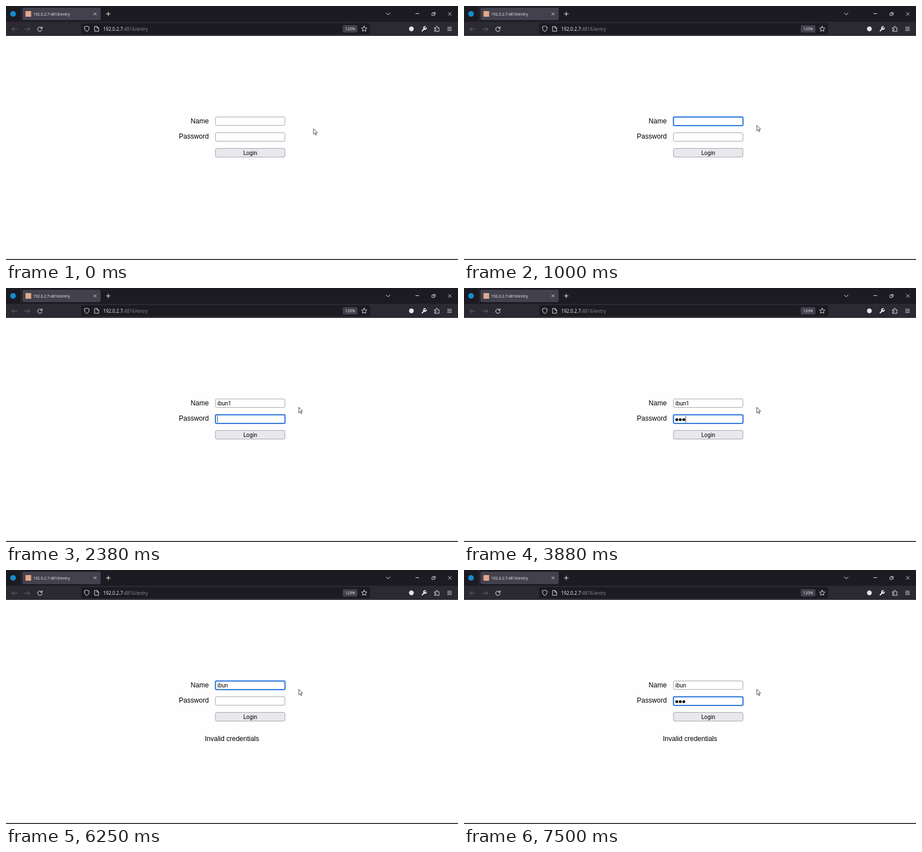
An HTML page with a canvas that plays this animation: 800 by 450 pixels, repeating every 8000 ms.

```html
<!DOCTYPE html>
<html lang="en">
<head>
<meta charset="utf-8">
<title>Login form</title>
<style>
  html, body { margin: 0; width: 100%; height: 100%; overflow: hidden; background: #fefefe; }
  canvas { display: block; width: 800px; height: 450px; }
</style>
</head>
<body>
<canvas id="stage"></canvas>
<script>
const canvas = document.getElementById('stage');
const ctx = canvas.getContext('2d');
const ratio = window.devicePixelRatio || 1;
canvas.width = 800 * ratio;
canvas.height = 450 * ratio;

const LOOP = 8000;
const UI = '"Open Sans", sans-serif';
const LABEL = '12px "Liberation Sans", Arial, sans-serif';
const FIELD = '10px Roboto, sans-serif';
const LIGHT = '#f4f4f8', DIM = '#6c6b75', BORDER = '#8f8f9d';
const HOST = '192.0.2.7', PATH = ':4816/entry';
const USER = 'ibun1';

// Each step lists only what changes: typed = letters in the name, dots = letters in the password.
const steps = [
  [0, { focus: '', caret: false, typed: 0, dots: 0, error: false, mouse: [544, 217], beam: false }],
  [130, { mouse: [523, 212] }],
  [250, { mouse: [486, 205], beam: true }],
  [380, { mouse: [478, 205] }],
  [500, { focus: 'name', caret: true }],
  [750, { mouse: [487, 206] }],
  [880, { mouse: [510, 209], beam: false }],
  [1000, { mouse: [518, 211], caret: false }],
  [1500, { typed: 1, caret: true }],
  [1630, { typed: 2 }],
  [1750, { typed: 3 }],
  [1880, { typed: 4 }],
  [2130, { typed: 5, caret: false }],
  [2380, { focus: 'password', caret: true }],
  [2880, { dots: 2 }],
  [3130, { dots: 3 }],
  [3380, { caret: false }],
  [3880, { caret: true }],
  [4250, { typed: 0, dots: 0, error: true }],
  [4500, { caret: false }],
  [5000, { caret: true }],
  [5130, { focus: 'name' }],
  [5250, { typed: 1 }],
  [5380, { typed: 2 }],
  [5630, { typed: 3 }],
  [5880, { typed: 4 }],
  [6250, { caret: false }],
  [6380, { focus: 'password', caret: true }],
  [6880, { caret: false }],
  [7000, { dots: 1 }],
  [7250, { dots: 2 }],
  [7500, { dots: 3 }]
];

function stateAt(time) {
  const state = {};
  for (const [start, change] of steps) {
    if (start > time) break;
    Object.assign(state, change);
  }
  return state;
}

function rect(x, y, w, h, color) {
  ctx.fillStyle = color;
  ctx.fillRect(x, y, w, h);
}

function box(x, y, w, h, radius, fill, stroke, width = 0.8) {
  ctx.beginPath();
  ctx.roundRect(x, y, w, h, radius);
  if (fill) { ctx.fillStyle = fill; ctx.fill(); }
  if (stroke) { ctx.strokeStyle = stroke; ctx.lineWidth = width; ctx.stroke(); }
}

function disc(x, y, r, color) {
  ctx.beginPath();
  ctx.arc(x, y, r, 0, Math.PI * 2);
  ctx.fillStyle = color;
  ctx.fill();
}

function text(str, x, y, font, color, align = 'left') {
  ctx.font = font;
  ctx.fillStyle = color;
  ctx.textAlign = align;
  ctx.fillText(str, x, y);
  return ctx.measureText(str).width;
}

// Strokes an SVG path placed at x, y.
function icon(x, y, path, color = LIGHT, width = 1) {
  ctx.save();
  ctx.translate(x, y);
  ctx.strokeStyle = color;
  ctx.lineWidth = width;
  ctx.lineJoin = ctx.lineCap = 'round';
  ctx.stroke(new Path2D(path));
  ctx.restore();
}

function drawTabs() {
  rect(0, 0, 800, 28, '#1c1b22');
  disc(12.5, 14, 5, '#168bd2');
  rect(26, 0, 1, 28, '#34333c');
  box(29, 3, 138.5, 22, 3, '#42414d');
  rect(34.5, 9, 10, 10, '#e3a88b');
  text(HOST + PATH, 48, 16.6, '6.8px ' + UI, LIGHT);
  icon(157.5, 14, 'M-2.2-2.2L2.2 2.2M2.2-2.2L-2.2 2.2', LIGHT, 0.8);
  icon(181, 14, 'M-3.5 0H3.5M0-3.5V3.5');
  icon(676.5, 14, 'M-3.3-1.6L0 1.7L3.3-1.6');
  icon(728, 13.5, 'M-2.8 0H2.8', LIGHT, 0.9);
  icon(757, 14, 'M-2.8-1.2H1.2V2.8H-2.8ZM-1.2-2.6H2.8V1.2', LIGHT, 0.8);
  icon(785.5, 14, 'M-2.8-2.8L2.8 2.8M2.8-2.8L-2.8 2.8', LIGHT, 0.8);
}

function drawStar(x, y) {
  let path = '';
  for (let i = 0; i < 10; i++) {
    const r = i % 2 ? 2.4 : 5;
    const a = i * Math.PI / 5 - Math.PI / 2;
    path += (i ? 'L' : 'M') + r * Math.cos(a) + ' ' + r * Math.sin(a);
  }
  icon(x, y, path + 'Z', LIGHT, 0.9);
}

function drawToolbar() {
  rect(0, 28, 800, 25, '#2b2a33');
  icon(15, 41, 'M4.5 0H-4.5M-1-3.5L-4.5 0L-1 3.5', DIM);
  icon(37.5, 41, 'M-4.5 0H4.5M1-3.5L4.5 0L1 3.5', DIM);
  icon(60, 41, 'M3.2-2.2A3.9 3.9 0 1 0 3.9 .8M4-4.3V-1.4H1.1');

  box(133, 30.5, 511.5, 19.5, 2.5, '#1c1b22');
  icon(143, 40.5, 'M0-4.8L4.2-3.2C4.2 1 2.7 3.6 0 4.8C-2.7 3.6-4.2 1-4.2-3.2Z', LIGHT, 0.9);
  icon(160.5, 40.5, 'M-3.3-4.3H.8L3.5-1.6V4.3H-3.3ZM.6-4.1V-1.3H3.3', LIGHT, 0.9);
  const hostWidth = text(HOST, 172, 43.9, '8.25px ' + UI, LIGHT);
  text(PATH, 172 + hostWidth, 43.9, '8.25px ' + UI, '#8d8c95');
  box(596, 34, 26, 13, 2, '#42414d');
  text('120%', 609, 43, '6.8px ' + UI, LIGHT, 'center');
  drawStar(634, 40.7);

  disc(717.5, 40.5, 4.2, '#e6e6ea');
  icon(740, 40.5, 'M-3.4 3.6L1-1', LIGHT, 2);
  icon(740, 40.5, 'M2.3-3.9A2.4 2.4 0 1 0 4-1.6', LIGHT, 1.7);
  icon(762.5, 40.5, 'M-3.8-2H-1.3V-3.2A1.3 1.3 0 0 1 1.3-3.2V-2H3.8V4.4H-3.8V2.4H-2.4A1.2 1.2 0 0 0-2.4 0H-3.8Z', LIGHT, 0.9);
  icon(785, 40.5, 'M-3.5-2.8H3.5M-3.5 0H3.5M-3.5 2.8H3.5', LIGHT, 0.9);
}

function drawInput(y, focused) {
  if (focused) {
    box(368.7, y - 1.8, 127.1, 19, 3.5, 'rgba(0,110,240,.12)');
    box(369.5, y - 1, 125.4, 17.4, 3, 'rgba(0,110,240,.34)');
    box(371, y + 0.3, 122.6, 15, 1.5, '#fff', '#0b5fd0', 1.4);
  } else {
    box(370.7, y + 0.2, 123, 15, 2, '#fff', BORDER);
  }
}

function drawForm(state) {
  text('Name', 358.8, 207.5, LABEL, '#000', 'right');
  text('Password', 358.8, 235, LABEL, '#000', 'right');
  drawInput(196.4, state.focus === 'name');
  drawInput(224.4, state.focus === 'password');

  const nameWidth = text(USER.slice(0, state.typed), 374, 208, FIELD, '#000');
  for (let i = 0; i < state.dots; i++) disc(376.6 + i * 6.2, 233.3, 2.5, '#000');
  if (state.caret) {
    const inName = state.focus === 'name';
    const offset = inName ? nameWidth : state.dots * 6.15;
    rect(Math.floor(374 + offset), inName ? 198.5 : 226.5, 0.8, 12, '#222');
  }

  box(370.7, 252.3, 123, 15.4, 2.5, '#e9e9ed', BORDER);
  text('Login', 432.3, 263.7, FIELD, '#000', 'center');
  if (state.error) text('Invalid credentials', 400, 303, LABEL, '#000', 'center');
}

function drawMouse([x, y], beam) {
  if (beam) {
    icon(x, y, 'M-2-5.5Q0-5.5 0-4.5Q0-5.5 2-5.5M0-4.5V4.5M-2 5.5Q0 5.5 0 4.5Q0 5.5 2 5.5', '#222', 0.8);
    return;
  }
  const arrow = new Path2D('M0 0V9.9L2.3 7.8L3.9 11.4L5.4 10.8L3.8 7.2L6.8 7Z');
  ctx.save();
  ctx.translate(x + 0.2, y + 0.3);
  ctx.fillStyle = '#fff';
  ctx.strokeStyle = '#222';
  ctx.lineWidth = 0.8;
  ctx.fill(arrow);
  ctx.stroke(arrow);
  ctx.restore();
}

function draw() {
  const state = stateAt(performance.now() % LOOP);
  ctx.setTransform(ratio, 0, 0, ratio, 0, 0);
  rect(0, 0, 800, 450, '#fefefe');
  drawTabs();
  drawToolbar();
  drawForm(state);
  drawMouse(state.mouse, state.beam);
  rect(0, 448.4, 800, 1.6, '#1d1c20');
  requestAnimationFrame(draw);
}
draw();
</script>
</body>
</html>
```
